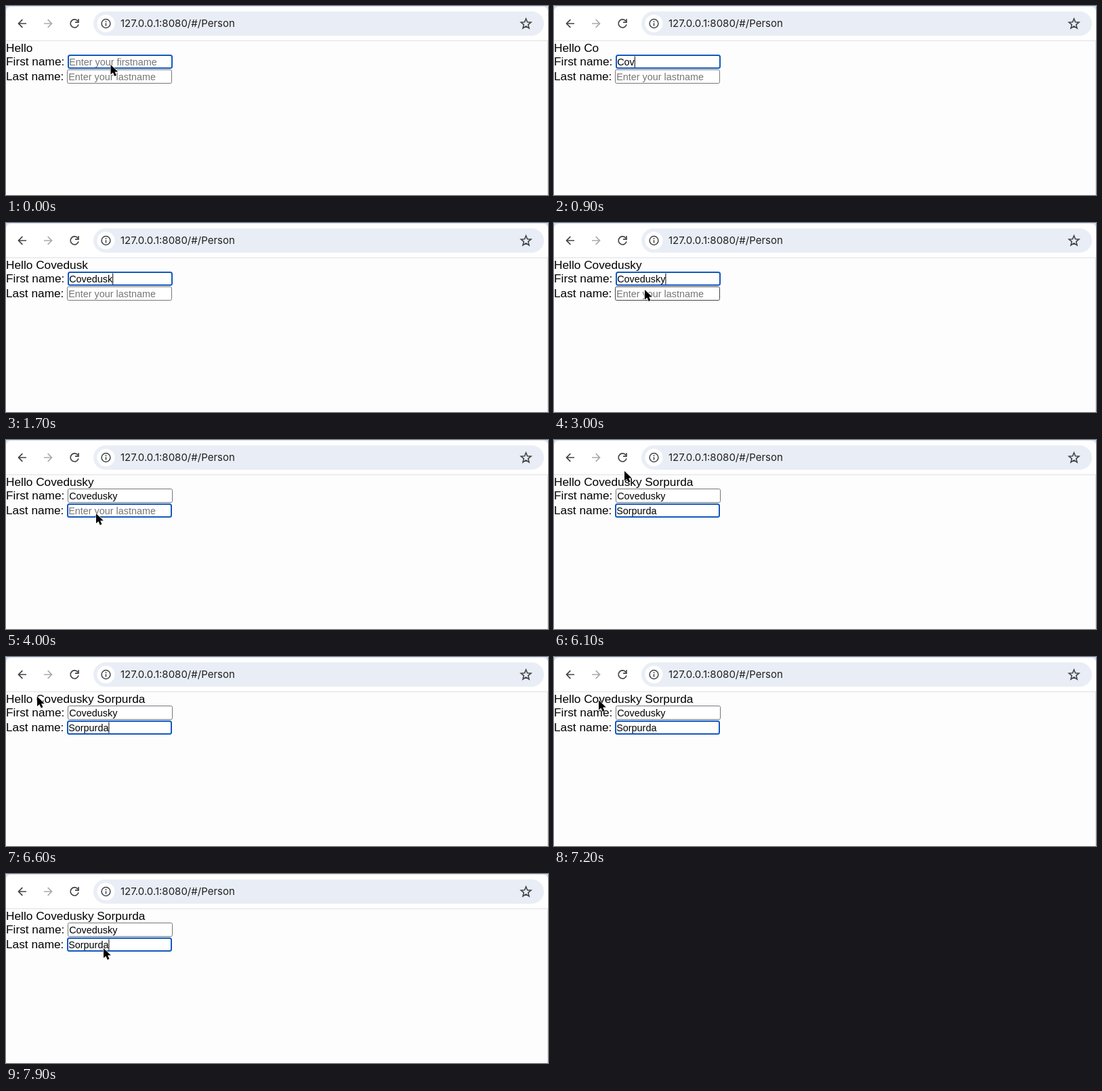
Write an HTML page that moves like this. It is 800 px wide and 280 px high and loops after 8 s.

```html
<!DOCTYPE html>
<html lang="en">
<head>
<meta charset="utf-8">
<title>Person form</title>
<style>
  html, body { margin: 0; width: 100%; height: 100%; overflow: hidden; background: #fdfdfd; }
  svg { display: block; }
  text { white-space: pre; }
  .page { font: 17.28px "Liberation Sans", Arial, sans-serif; }
  .field { font: 14.4px "Liberation Sans", Arial, sans-serif; }
  .url { font: 15px Inter, Roboto, sans-serif; fill: #1f1f1f; }
  .icon { fill: none; stroke: #404347; stroke-width: 1.7; }
</style>
</head>
<body>
<svg width="800" height="280" viewBox="0 0 800 280">
  <rect width="800" height="280" fill="#fdfdfd"/>
  <rect width="800" height="12" fill="#d0e0fa"/>
  <path d="M0 51V9Q0 1 8 1H792Q800 1 800 9V51Z" fill="#fff"/>
  <path d="M0 51.5H800" stroke="#dfe1e5"/>
  <path d="M799.5 52V280" stroke="#dcdde0"/>

  <g class="icon">
    <path d="M30 26H19M24.3 20.2 18.5 26l5.8 5.8"/>
    <path d="M56 26H67M61.7 20.2 67.5 26l-5.8 5.8" stroke="#a9abae"/>
    <path d="M106 22.4A6 6 0 1 0 107 27.4"/>
    <path d="M107 19.2V24.2H102"/>
  </g>
  <rect x="129" y="8" width="665" height="36" rx="18" fill="#e9eef6"/>
  <circle cx="147.5" cy="26" r="13" fill="#fff"/>
  <g class="icon">
    <circle cx="147.5" cy="26" r="6.4" stroke-width="1.5"/>
    <path d="M147.5 25.3V29.6M147.5 22.3V23.9" stroke-width="1.6"/>
    <path id="star" stroke-width="1.6" stroke-linejoin="miter"/>
  </g>
  <text class="url" x="169" y="31.3">127.0.0.1:8080/#/Person</text>

  <g class="page">
    <text id="greeting" x="0" y="68"></text>
    <text x="0" y="88">First name:</text>
    <text x="0" y="109.6">Last name:</text>
  </g>
  <g id="fields" class="field"></g>
  <path id="pointer" d="M0 0V14.6L3.4 11.4 5.8 17 8.5 15.8 6.1 10.4H10.8Z"
        fill="#000" stroke="#fff" stroke-width="1.1" stroke-linejoin="round" paint-order="stroke"/>
</svg>
<script>
const LOOP = 8000, STEP = 100, ECHO_DELAY = 100, BLINK = 500;
const FOCUS_LAST = 3300;
const $ = id => document.getElementById(id);

const first = {
  x: 91, y: 72, hint: 'Enter your firstname', name: 'Covedusky',
  keys: [500, 800, 900, 1100, 1200, 1300, 1500, 1600, 2000], focusAt: 100
};
const last = {
  x: 90, y: 94, hint: 'Enter your lastname', name: 'Sorpurda',
  keys: [4500, 4700, 4900, 5000, 5100, 5200, 5500, 5600], focusAt: FOCUS_LAST
};

// Pointer stops: time, x, y. It hides while the user types.
const trips = [
  [[0, 154.5, 87], [500, 154.5, 87]],
  [[2500, 153, 88], [3000, 134, 99], [3300, 133, 109], [4500, 133, 109]],
  [[6000, 122, 74], [6100, 104, 46], [6400, 62, 55], [6800, 30, 62],
   [7200, 66, 64], [7700, 142, 106], [7900, 144, 110], [8000, 144, 110]]
];

function add(parent, tag, attrs) {
  const el = document.createElementNS('http://www.w3.org/2000/svg', tag);
  for (const key in attrs) el.setAttribute(key, attrs[key]);
  return parent.appendChild(el);
}

function buildField(f) {
  f.box = add($('fields'), 'rect', { fill: '#fff' });
  f.text = add($('fields'), 'text', { x: f.x + 2.2, y: f.y + 15.8 });
  f.caret = add($('fields'), 'rect', { y: f.y + 2.5, width: 1, height: 16.5 });
}

function starPath(cx, cy, outer, inner) {
  const points = Array.from({ length: 10 }, (_, i) => {
    const r = i % 2 ? inner : outer, a = (i / 5 - 0.5) * Math.PI;
    return (cx + r * Math.cos(a)).toFixed(2) + ' ' + (cy + r * Math.sin(a)).toFixed(2);
  });
  return 'M' + points.join('L') + 'Z';
}

const typed = (f, t) => f.name.slice(0, f.keys.filter(k => k <= t).length);

function drawField(f, t, focused, hovered) {
  const value = typed(f, t), inset = focused ? 1 : 0.5;
  const set = (el, attrs) => { for (const k in attrs) el.setAttribute(k, attrs[k]); };
  set(f.box, {
    x: f.x + inset, y: f.y + inset,
    width: 155 - 2 * inset, height: 21 - 2 * inset, rx: focused ? 2.5 : 2,
    stroke: focused ? '#1259bd' : hovered ? '#444' : '#767676',
    'stroke-width': focused ? 2 : 1
  });
  f.text.textContent = value || f.hint;
  f.text.setAttribute('fill', value ? '#000' : '#757575');

  const since = t - Math.max(f.focusAt, ...f.keys.filter(k => k <= t));
  const lit = focused && since >= 0 && Math.floor(since / BLINK) % 2 === 0;
  f.caret.setAttribute('x', f.x + 2.2 + (value ? f.text.getComputedTextLength() : 0));
  f.caret.setAttribute('visibility', lit ? 'visible' : 'hidden');
}

function pointerAt(t) {
  const stops = trips.find(s => t >= s[0][0] && t < s[s.length - 1][0]);
  if (!stops) return null;
  const i = stops.findIndex(s => s[0] > t);
  const [t0, x0, y0] = stops[i - 1], [t1, x1, y1] = stops[i];
  const p = (t - t0) / (t1 - t0);
  return [x0 + (x1 - x0) * p, y0 + (y1 - y0) * p];
}

function render(ms) {
  const t = Math.floor((ms % LOOP) / STEP) * STEP;
  const echo = f => typed(f, t - ECHO_DELAY);
  $('greeting').textContent = ['Hello', echo(first), echo(last)].filter(Boolean).join(' ');

  const p = pointerAt(t);
  const over = f => !!p && p[0] > f.x && p[0] < f.x + 155 && p[1] > f.y && p[1] < f.y + 21;
  drawField(first, t, t < FOCUS_LAST, over(first));
  drawField(last, t, t >= FOCUS_LAST, over(last));

  $('pointer').setAttribute('visibility', p ? 'visible' : 'hidden');
  if (p) $('pointer').setAttribute('transform', `translate(${p[0]} ${p[1]})`);
}

[first, last].forEach(buildField);
$('star').setAttribute('d', starPath(767.5, 26.6, 7.8, 3.4));

const start = performance.now();
function tick() {
  render(performance.now() - start);
  requestAnimationFrame(tick);
}
tick();
</script>
</body>
</html>
```
